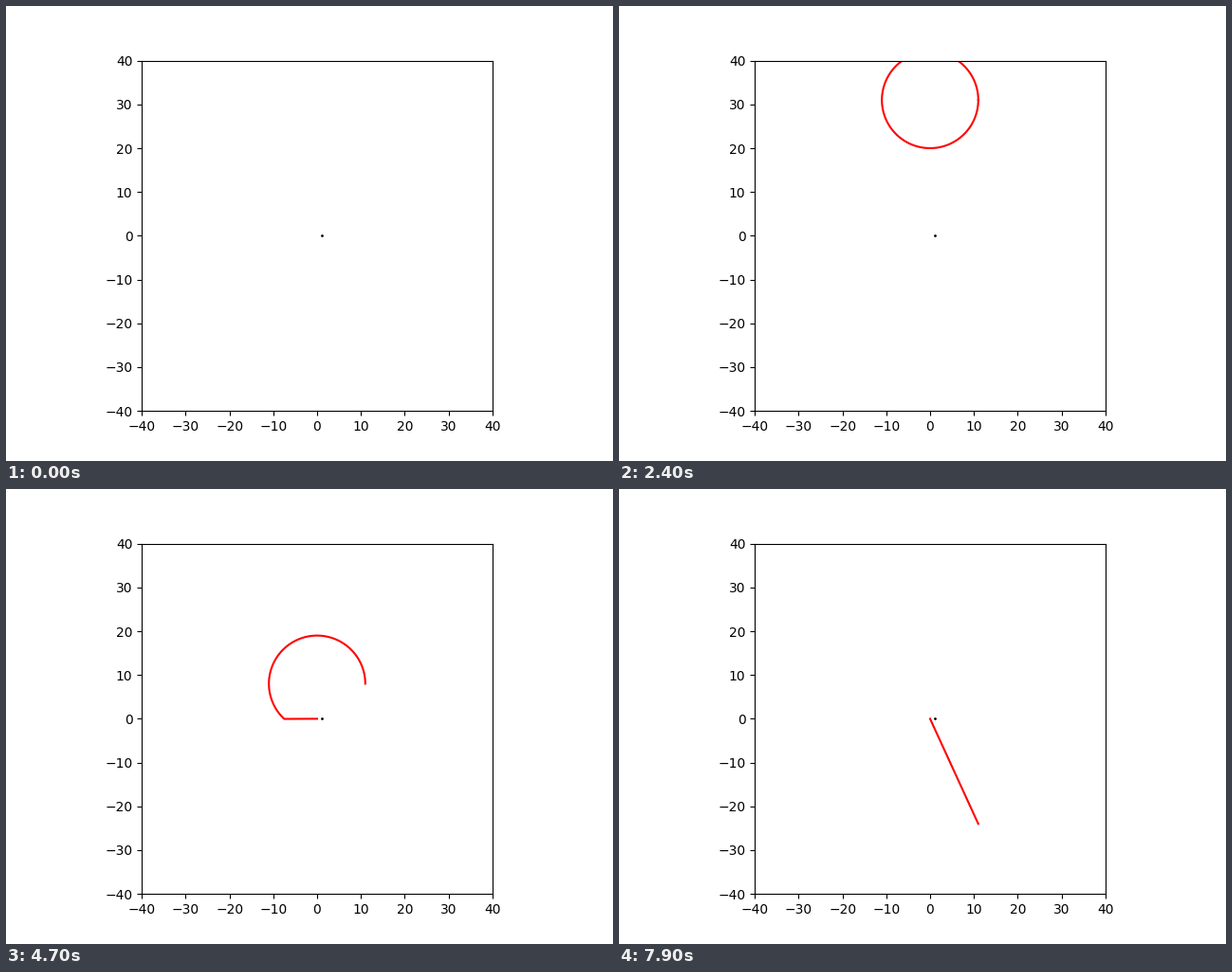
Write a matplotlib script that moves like this. It is 640x480 px and loops after 8000 ms.

```python
import numpy as np
import matplotlib.pyplot as plt
from matplotlib.animation import FuncAnimation

RADIUS = 11
START_Y = 55
LIMIT = 40
FRAMES, STEP_MS = 80, 100
ANGLES = np.arange(0, 2 * np.pi, 0.005)

fig, ax = plt.subplots(figsize=(6.4, 4.8), dpi=100)
ax.set_aspect("equal")
ax.set_xlim(-LIMIT, LIMIT)
ax.set_ylim(-LIMIT, LIMIT)
ax.plot([1], [0], "ko", markersize=2, markeredgewidth=0)
ring, = ax.plot([], [], "r", linewidth=1.5)


def ring_points(center_y):
    """Trace the ring until it meets the ground; the rest stays at the origin."""
    x = RADIUS * np.cos(ANGLES)
    y = center_y + RADIUS * np.sin(ANGLES)
    below = np.flatnonzero(y <= 0)
    if below.size:
        x[below[0] + 1:] = 0
        y[below[0] + 1:] = 0
    return x, y


def draw(frame):
    center_y = START_Y - frame
    ring.set_data(*ring_points(center_y))
    ring.set_visible(center_y - RADIUS < LIMIT)
    return ring,


anim = FuncAnimation(fig, draw, frames=FRAMES, interval=STEP_MS,
                     init_func=lambda: draw(0), repeat=True, repeat_delay=0)
plt.show()
```
